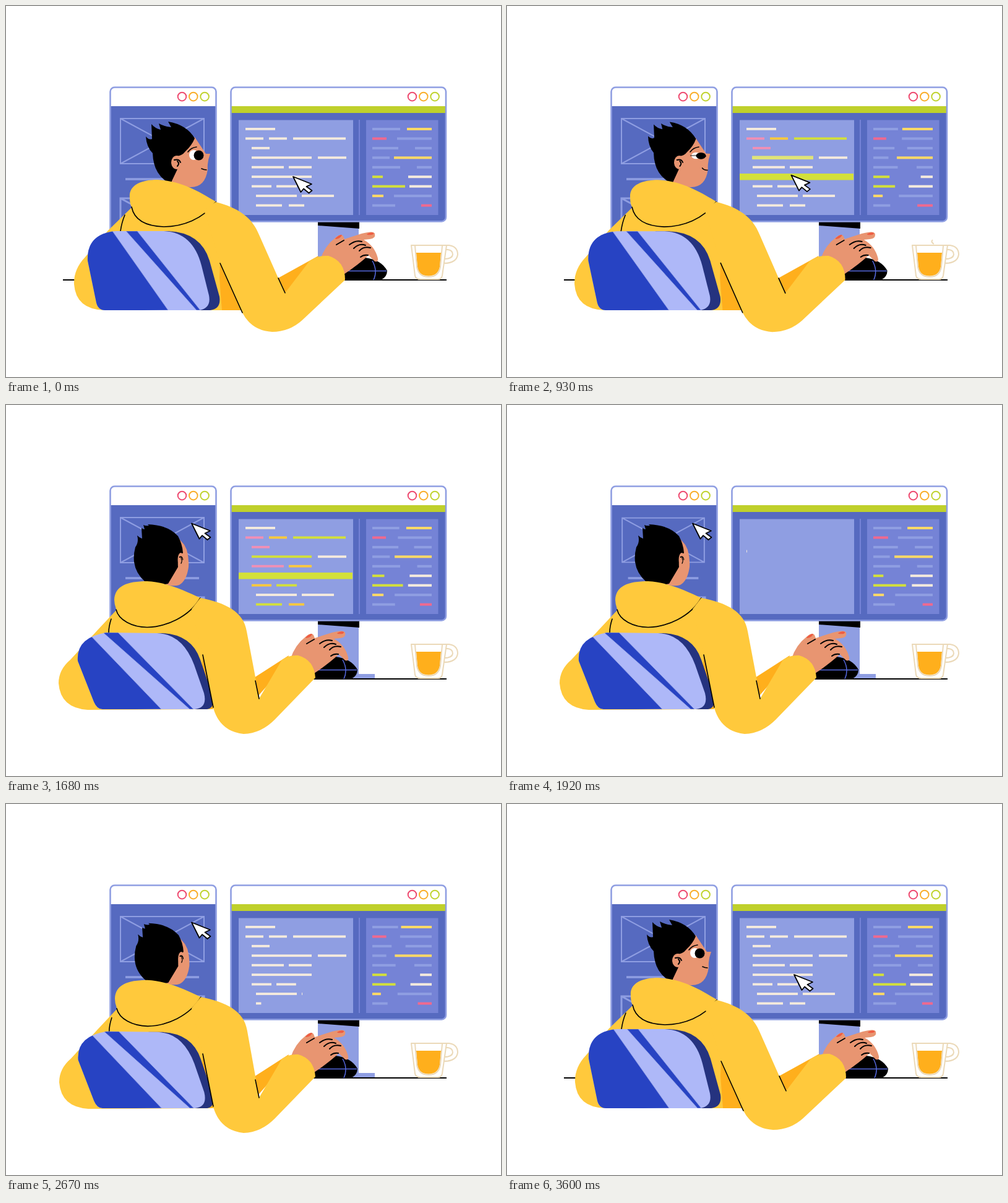
An HTML page that plays this animation: 800 px wide and 600 px high, repeating every 3630 ms.

```html
<!DOCTYPE html>
<html lang="en">
<head>
<meta charset="utf-8">
<title>Designer at work</title>
<style>
html, body { margin: 0; width: 100%; height: 100%; overflow: hidden; background: #fff; }
svg { display: block; width: 100vw; height: 100vh; }
.line { fill: none; stroke: #000; stroke-width: 1.6; stroke-linecap: round; }
.wire { fill: none; stroke: #8f9ee2; stroke-width: 2; }
.glass { fill: none; stroke: #ebd9b8; stroke-width: 2; stroke-linejoin: round; }
.hoodie { fill: #ffc93c; }
.shade { fill: #ffaf1c; }
.skin { fill: #e89571; }
.blue { fill: #2743c3; }
</style>
</head>
<body>
<svg viewBox="0 0 800 600">
  <defs>
    <clipPath id="faceClip"><path data-shape="face"/></clipPath>
    <clipPath id="chairClip"><path data-shape="chair"/></clipPath>
    <clipPath id="paneClip"><rect x="376" y="184.5" width="185" height="153.5"/></clipPath>
  </defs>

  <path id="steamA" class="glass" pathLength="100" d="M677 383q-7-4 0-8.5t0-8.5t0-8.5t0-8.5t0-8.5"/>
  <path id="steamB" class="glass" pathLength="100" d="M690 385q-7-4 0-8.5t0-8.5t0-8.5t0-8.5t0-8.5"/>

  <!-- preview window -->
  <rect x="168.5" y="131.500" width="171" height="290" rx="7" fill="#566ac0"/>
  <path d="M168.500 162V138.500a7 7 0 0 1 7-7h157a7 7 0 0 1 7 7V162z" fill="#fff"/>
  <g id="thumb" class="wire">
    <path d="M185 182H320V255H185zL320 255M320 182L185 255"/>
  </g>
  <path id="caption" d="M193 280H312" stroke="#8f9ee2" stroke-width="3.5"/>
  <path class="wire" style="stroke-width:3" d="M185 311H320V384H185zL320 384M320 311L185 384"/>
  <rect x="168.500" y="131.500" width="171" height="290" rx="7" class="wire" style="stroke-width:2.600"/>

  <!-- monitor -->
  <path d="M504 345H570V435H596V443H504z" fill="#8f9ee2"/>
  <path d="M504 345H571V360L504 355z"/>
  <rect x="363.500" y="131.500" width="347.500" height="217" rx="7" fill="#566ac0"/>
  <path d="M363.500 163V138.500a7 7 0 0 1 7-7h333.500a7 7 0 0 1 7 7V163z" fill="#fff"/>
  <rect x="364" y="162" width="346.500" height="11" fill="#bfd02b"/>
  <rect x="376" y="184.500" width="185" height="153.500" fill="#8f9ee2"/>
  <path d="M571 184V338" stroke="#7583d6" stroke-width="2"/>
  <rect x="582" y="184.500" width="116.500" height="153.500" fill="#7583d6"/>
  <rect x="363.500" y="131.500" width="347.500" height="217" rx="7" class="wire" style="stroke-width:2.600"/>
  <g id="rings" fill="none" stroke-width="2"></g>
  <g clip-path="url(#paneClip)">
    <g id="code"></g>
    <rect id="mark" x="376" y="271" height="10.500" fill="#d3e03a"/>
  </g>
  <g id="side"></g>

  <!-- desk and cup -->
  <path d="M92 443H712" stroke="#000" stroke-width="2"/>
  <path d="M655 387H712L705 436Q704 442 698 442H670Q662 442 661 436z" class="glass" style="fill:#fff"/>
  <path d="M663 399H703L701 422Q698 436.500 683 436.500Q667 436.500 665 422z" class="shade"/>
  <path d="M661 388L664 422Q667 438 683 438Q699 438 702 422L705 388" class="glass"/>
  <path d="M710 387H716Q730 389 730 402Q728 416 708 416M711 394H714Q722 395 722 402Q721 409 709 409" class="glass"/>

  <!-- mouse and hand -->
  <g id="hand">
    <path d="M530 443V425Q550 407 580 407Q606 410 616 428Q616 438 606 443z"/>
    <path d="M545 428.500H615M592 412Q601 428 594 443" fill="none" stroke="#566ae0" stroke-width="1.500"/>
    <path class="skin" d="M508 410Q515 388 532 375Q541 367 545 372L547 377L575 368Q594 363 596 368Q598 376 588 377L578 378Q596 388 601 408Q602 415 596 413L586 403Q570 418 546 434L528 424z"/>
    <path d="M532 376Q539 369 543 370Q541 376 533 377zM583 369Q589 365 594 367Q595 371 584 370z" fill="#ee5c42"/>
    <path class="line" style="stroke-width:2" d="M534 386L546 379M555 386Q565 378 575 381M562 392Q571 383 581 387M571 396Q578 388 589 391M573 406Q578 402 585 403"/>
  </g>

  <!-- person -->
  <path data-shape="torso" class="hoodie"/>
  <path data-shape="gap" class="shade"/>
  <path data-shape="face" class="skin"/>
  <g clip-path="url(#faceClip)">
    <g id="features">
      <g id="eye">
        <ellipse cx="303.500" cy="241" rx="7.500" ry="8" fill="#fff"/>
        <ellipse cx="311.500" cy="241.500" rx="8" ry="8"/>
      </g>
      <path id="lid" class="line" style="stroke-width:2" d="M295 242Q306 241 319 243"/>
      <path class="line" d="M294 236Q299 229 308 228"/>
      <path id="mouth" class="line"/>
    </g>
  </g>
  <path data-shape="hair"/>
  <g id="ear">
    <ellipse rx="9" ry="11" class="skin"/>
    <path class="line" style="stroke-width:2" d="M-4-4Q4-6 6 0M1-2Q5 2 1 6"/>
  </g>
  <path data-shape="hood" class="hoodie"/>
  <path data-shape="seam" class="line"/>
  <path data-shape="fold" class="line"/>
  <path data-shape="chairBack" fill="#25337f"/>
  <path data-shape="chair" fill="#aeb8f8"/>
  <g clip-path="url(#chairClip)" stroke="#8f9ee2" stroke-width=".8">
    <path data-shape="chairSide" class="blue"/>
    <path data-shape="chairStripe" class="blue"/>
  </g>
  <path data-shape="elbow" class="shade"/>
  <path data-shape="arm" class="hoodie"/>
  <path data-shape="armLines" class="line"/>
  <path id="cursor" d="M0 0L30 12L21.500 16L30.500 22.500L25.500 26.500L17 19.500L12.500 25z" fill="#fff" stroke="#000" stroke-width="1.800" stroke-linejoin="round"/>
</svg>

<script>
const LOOP = 3630;
const $ = id => document.getElementById(id);
const clamp = v => Math.max(0, Math.min(1, v));
const lerp = (a, b, p) => a + (b - a) * p;
const ramp = (t, from, to) => clamp((t - from) / (to - from));
const ease = (t, from, to) => { const u = ramp(t, from, to); return u * u * (3 - 2 * u); };
const there = (t, a, b, c, d) => ease(t, a, b) - ease(t, c, d);

function add(parent, tag, attrs) {
  const el = document.createElementNS('http://www.w3.org/2000/svg', tag);
  for (const k in attrs) el.setAttribute(k, attrs[k]);
  return $(parent).appendChild(el);
}

// Blends the numbers of two path strings; p may depend on the number's index.
function blend(a, b, p) {
  const nums = b.match(/[\d.]+/g);
  let i = 0;
  return a.replace(/[\d.]+/g, n => {
    const w = typeof p === 'function' ? p(i) : p;
    return lerp(+n, +nums[i++], w).toFixed(2);
  });
}

// Finds the segment of a key list that holds p.
function segment(keys, p) {
  let i = 0;
  while (i < keys.length - 2 && p > keys[i + 1]) i++;
  return [i, ramp(p, keys[i], keys[i + 1])];
}

// Body shapes: turned right, turned left.
const body = {
  torso: ['M203 326L165 363L128 406Q109 426 110 450Q113 490 158 492L383 492L346 416L345 320Z',
          'M178 332L148 364L104 412Q85 428 85 450Q88 490 132 493L335 492L318 404L318 313Z'],
  hood: ['M200 310C198 290 218 281 245 281C285 283 315 302 340 317C318 345 285 357 255 357C225 356 207 345 203 325Q200 320 200 310Z',
         'M175 315C176 293 195 285 228 285C262 287 290 301 314 312C296 343 258 359 228 359.5C204 359 182 348 178 330Q175 322 175 315Z'],
  seam: ['M339 317C318 345 285 357 255 357C225 356 207 345 203 325',
         'M314 312C296 343 258 359 228 359.5C204 359 182 348 178 331'],
  fold: ['M192 338Q187 350 185 364', 'M170 346Q166 358 166 368'],
  chairBack: ['M240 364L262 364Q315 366 329 412L345 470Q348 490 330 492L300 492Z',
              'M230 369L252 369Q300 371 314 412L334 470Q338 490 325 492L290 492Z'],
  chair: ['M178 364Q130 368 132 412L146 480Q149 492 160 492L313 492Q332 488 328 468L316 420Q302 366 255 364Z',
          'M162 368Q113 376 116 414L142 480Q147 492 156 492L305 492Q326 490 320 466L304 420Q285 370 244 369Z'],
  chairSide: ['M100 360L172 364L262 492L100 494Z', 'M80 360L132 368L251 492L80 494Z'],
  chairStripe: ['M194 364L212 364L314 492L308 492Z', 'M157 368L181 368L303 492L297 492Z']
};
const limb = {
  gap: ['M346 416L383 492L349 492L345 440Z', 'M318 404L335 490L330 492L316 440Z'],
  elbow: ['M438 441L505 404L500 420L451 464Z', 'M401 441L457 405L452 420L408 470Z'],
  arm: ['M339 317C375 326 398 342 409 370L440 440L451 464L490 413Q503 403 521 404Q548 412 548 443L482 505Q460 527 430 527Q397 525 382 496L346 416L320 330Z',
        'M314 312C355 320 384 334 389 366L403 440L409 475L446 412Q457 404 472 405Q498 412 500 441L437 506Q414 531 384 532Q346 528 335 490L318 404L300 330Z'],
  armLines: ['M346 416L382 496M440 440L451 464', 'M318 404L335 489M403 446L409 475']
};

// Head shapes along the turn.
const hairKeys = [0, .09, .68, 1];
const hair = [
  'M305 214Q292 192 262 187L267 196Q256 195 247 190L250 200Q241 198 235 191L236 215Q231 217 226 211Q227 228 237 238Q238 270 260 284Q268 287 268 283L277 264Q262 252 274 243Q284 243 290 235Q300 226 305 214Z',
  'M306 216Q291 191 264 188L269 196Q260 196 252 190L253 198Q246 198 240 192L241 211Q236 214 231 210Q230 226 237 236Q237 270 262 284Q270 287 270 284L279 264Q270 252 282 243Q289 243 294 236Q303 228 306 216Z',
  'M286 213Q268 191 239 191L241 195Q236 196 229 197L231 204Q230 206 228 207L229 214Q225 214 222 209Q224 217 220 226Q209 268 238 285Q254 291 264 289L281 264Q282 244 288 242Q293 241 293 237Q294 225 286 213Z',
  'M278 212Q262 194 229 193L231 195Q226 196 222 194L224 201Q222 201 219 199L220 216Q216 215 212 211Q215 222 209 230Q200 264 225 286Q245 293 262 289L278 262Q277 244 281 241Q285 241 286 239Q285 225 278 212Z'
];
const faceKeys = [0, .68, 1];
const face = [
  'M305 212L323 239L330 239Q325 252 326 264Q322 294 297 293Q279 292 262 283L280 230Z',
  'M284 212L298 230L302 238Q306 250 305 264Q303 287 285 292Q276 294 262 290L270 230Z',
  'M276 212L288 226L292 234Q296 248 295 262Q292 284 280 291Q272 294 255 290L262 230Z'
];
const ear = [[276, 253, 1], [282, 253, .85], [288.5, 251, .6], [282.5, 250, .55]];

const CREAM = '#f5ebdd', PINK = '#f18fb5', GOLD = '#ffc93c', LIME = '#d3e03a', LILAC = '#8f9ee2', YELLOW = '#ffd966', ROSE = '#f0698f';
const rowY = r => 197 + r * 15.45;

// Code rows: [from, to, colour after highlighting]; "turn" is the order of colouring.
const code = [
  { segs: [[387, 435]] },
  { turn: 0, segs: [[387, 416, PINK], [425, 454, GOLD], [464, 549, LIME]] },
  { turn: 1, segs: [[397, 426, PINK]] },
  { turn: 2, segs: [[397, 494, LIME], [504, 550]] },
  { turn: 3, segs: [[397, 449, PINK], [457, 494, GOLD]] },
  { segs: [[397, 494]] },
  { turn: 4, segs: [[397, 429, GOLD], [437, 470, LIME]] },
  { segs: [[404, 470], [478, 530]] },
  { turn: 5, segs: [[404, 446, LIME], [457, 482, GOLD]] }
];
for (const row of code) row.els = row.segs.map(() => add('code', 'rect', {}));

// Side rows: two colours, then bar ends (left bar, right bar) at each key time.
const sideKeys = [0, 405, 660, 1240, 1815];
const side = [
  [LILAC, YELLOW, 637, 648, 639, 643, 636, 638, 627, 640],
  [ROSE, LILAC, 615, 632, 620, 631, 617, 635, 608, 642],
  [LILAC, LILAC, 634, 661, 621, 650, 619, 644, 635, 650],
  [LILAC, YELLOW, 620, 627, 612, 622, 612, 626, 622, 635],
  [LILAC, LILAC, 637, 664, 627, 657, 627, 657, 637, 668],
  [LIME, CREAM, 609, 650, 605, 661, 611, 670, 627, 667],
  [LIME, CREAM, 645, 652, 644, 666, 633, 660, 620, 636],
  [YELLOW, LILAC, 610, 627, 605, 629, 604, 632, 611, 635],
  [LILAC, ROSE, 629, 671, 616, 675, 613, 669, 627, 656]
].map(([left, right, ...ends], r) => ({
  ends,
  bars: [left, right].map(fill => add('side', 'rect', { x: 592, y: rowY(r), height: 4, fill }))
}));

for (const x of [284.5, 656.5])
  ['#ee4b71', '#f9ae2b', '#c0d330'].forEach((stroke, i) =>
    add('rings', 'circle', { cx: x + i * 18.3, cy: 146.6, r: 6.8, stroke }));

const setShape = (name, d) =>
  document.querySelectorAll(`[data-shape=${name}]`).forEach(el => el.setAttribute('d', d));
const move = (id, value) => $(id).setAttribute('transform', value);

function drawPerson(t) {
  const turn = there(t, 870, 1400, 2600, 3200);
  const reach = there(t, 870, 1480, 2790, 3310);
  for (const name in body) setShape(name, blend(...body[name], turn));
  for (const name in limb)
    setShape(name, blend(...limb[name], name === 'arm' ? i => i < 8 ? turn : reach : reach));

  let [i, p] = segment(faceKeys, turn);
  setShape('face', blend(face[i], face[i + 1], p));
  [i, p] = segment(hairKeys, turn);
  setShape('hair', blend(hair[i], hair[i + 1], p));
  const [x, y, s] = ear[i].map((v, k) => lerp(v, ear[i + 1][k], p));
  move('ear', `translate(${x} ${y}) scale(${s} 1)`);

  const wink = there(t, 430, 560, 880, 980);
  move('features', `translate(${turn * 55} 0)`);
  move('eye', `translate(0 244) scale(1 ${1 - .68 * wink}) translate(0 -244)`);
  $('lid').style.opacity = wink;
  $('mouth').setAttribute('d', blend('M316 263Q320 265 324 265', 'M311 261Q313 267 321 266', wink));

  move('hand', `translate(${-48 * reach} 0)`);
  move('cursor', `translate(${lerp(464, 300, reach)} ${lerp(276, 191.5, reach)})`);
}

function drawCode(t) {
  const typing = t > 1900 || t < 0;
  $('code').style.opacity = typing ? 1 : 1 - ramp(t, 1720, 1880);
  $('mark').style.opacity = 1 - ramp(t, 1720, 1880);
  $('mark').setAttribute('width', 184 * ease(t, 400, 560));
  const drop = typing ? 40 * (1 - ramp(t, 1900, 2600)) ** 2 : 0;

  code.forEach(({ segs, els, turn }, r) => {
    const start = segs[0][0], end = segs[segs.length - 1][1];
    const shown = typing ? lerp(start, end, ease(t, 1900 + 90 * r, 2150 + 90 * r)) : end;
    segs.forEach(([from, to, tint], k) => {
      const at = 600 + 110 * turn + 25 * k;
      const u = tint && !typing ? ramp(t, at, at + 180) : 0;
      const grow = Math.sin(Math.PI * u);
      const el = els[k];
      el.setAttribute('x', from - grow);
      el.setAttribute('y', rowY(r) + drop - grow);
      el.setAttribute('width', Math.max(0, Math.min(to, shown) - from + 2 * grow));
      el.setAttribute('height', 3.8 + 2 * grow);
      el.style.fill = tint ? `color-mix(in srgb, ${tint} ${u * 100}%, ${CREAM})` : CREAM;
    });
  });
}

function drawSide(t) {
  const [i, u] = segment(sideKeys, t % 1815);
  const p = ease(u, 0, 1);
  for (const { ends, bars } of side) {
    const [left, right] = [0, 1].map(k => lerp(ends[i * 2 + k], ends[(i * 2 + 2 + k) % 8], p));
    bars[0].setAttribute('width', left - 592);
    bars[1].setAttribute('x', right);
    bars[1].setAttribute('width', 688 - right);
  }
}

function drawSteam(id, u) {
  $(id).style.strokeDasharray = '40 300';
  $(id).style.strokeDashoffset = 40 - 140 * u;
  $(id).style.opacity = u > 0 && u < 1 ? Math.min(1, 5 * (1 - u)) : 0;
}

function draw(t) {
  drawPerson(t);
  drawCode(t);
  drawSide(t);
  drawSteam('steamA', ramp(t, 300, 900));
  drawSteam('steamB', ramp(t, 860, 1500));
  const pulse = there(t, 1780, 2200, 2240, 2600);
  move('thumb', `translate(252.5 218.5) scale(${1 - .065 * pulse}) translate(-252.5 -218.5)`);
  $('caption').setAttribute('d', `M${193 + 10 * pulse} 280H${312 - 10 * pulse}`);
}

function tick() {
  draw(performance.now() % LOOP);
  requestAnimationFrame(tick);
}
tick();
</script>
</body>
</html>
```
